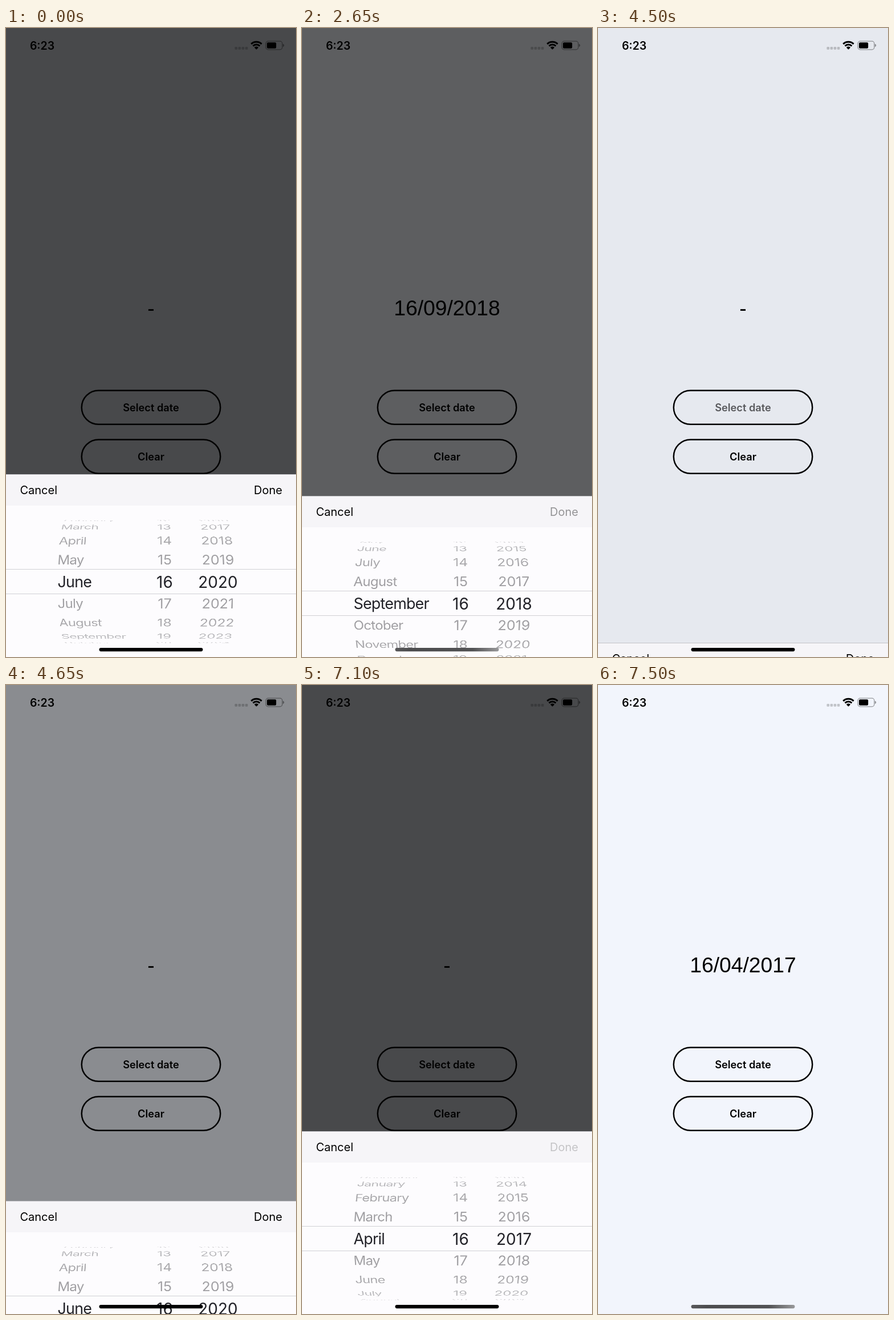
An HTML page with a canvas that plays this animation: 509 px wide and 1101 px high, repeating every 8000 ms.

```html
<!DOCTYPE html>
<html lang="en">
<head>
<meta charset="utf-8">
<title>Date picker</title>
<style>
  html, body { margin: 0; width: 509px; height: 1101px; overflow: hidden; background: #f2f5fc; }
  canvas { display: block; width: 509px; height: 1101px; }
</style>
</head>
<body>
<canvas id="stage" width="509" height="1101"></canvas>
<script>
const W = 509, H = 1101, LOOP = 8000;
const SHEET_TOP = 782, SHEET_H = H - SHEET_TOP;
const UI = 'Inter, "Liberation Sans", sans-serif';
const MONTHS = ['January', 'February', 'March', 'April', 'May', 'June', 'July',
  'August', 'September', 'October', 'November', 'December'];

// Wheel geometry: rows sit on a cylinder seen in weak perspective
const RADIUS = 108, STEP = 0.3639, DEPTH = 11.7, BAND = 21, ZOOM = 1.12, SS = 2;
const STRIP_H = Math.PI * RADIUS;

const ctx = document.getElementById('stage').getContext('2d');
const strip = document.createElement('canvas');
strip.width = W * SS;
strip.height = Math.ceil(STRIP_H * SS);
const sctx = strip.getContext('2d');

const clamp = v => Math.max(0, Math.min(1, v));
const linear = (t, a, b) => clamp((t - a) / (b - a));
const ease = (t, a, b) => { const p = linear(t, a, b); return p * p * (3 - 2 * p); };
const mod = (n, m) => ((n % m) + m) % m;

function label(c, text, x, y, font, { align = 'left', color = '#000', alpha = 1, spacing = 0 } = {}) {
  c.save();
  c.font = font;
  c.textAlign = align;
  c.fillStyle = color;
  c.globalAlpha *= alpha;
  c.letterSpacing = spacing + 'px';
  c.fillText(text, x, y);
  c.restore();
}

function roundBox(x, y, w, h, r) {
  ctx.beginPath();
  ctx.roundRect(x, y, w, h, r);
}

// --- state at time t ---

function stateAt(t) {
  const first = t < 3500;
  return {
    open: 1 - ease(t, 2571, 2941) + ease(t, 4440, 4805) - ease(t, 7121, 7491),
    month: first
      ? 5 + 2.75 * ease(t, 225, 450) + 0.25 * ease(t, 640, 705)
      : 5 - 2 * ease(t, 5110, 5550),
    day: 16,
    year: first
      ? 2020 - 1.6 * ease(t, 1275, 1450) - 0.4 * ease(t, 1735, 1850)
      : 2020 - 2.8 * ease(t, 6025, 6200) - 0.2 * ease(t, 6385, 6500),
    date: t >= 2600 && t < 4000 ? '16/09/2018' : t >= 7120 ? '16/04/2017' : '-',
    clear: 1 - 0.8 * linear(t, 3790, 3900) + 0.8 * linear(t, 4000, 4250),
    select: 1 - 0.65 * linear(t, 4390, 4440) + 0.65 * linear(t, 4440, 4590),
    done: t >= 7095 ? 0.2 + 0.8 * linear(t, 7140, 7390)
      : t >= 2445 ? 0.2 + 0.8 * linear(t, 2590, 2840) : 1,
    grey: linear(t, 2590, 2640) - linear(t, 4440, 4490) + linear(t, 7140, 7190)
  };
}

// --- main screen ---

function drawButton(y, text, alpha) {
  ctx.strokeStyle = '#000';
  ctx.lineWidth = 2.5;
  roundBox(132.75, y + 1.5, 243.5, 59.3, 29.65);
  ctx.stroke();
  label(ctx, text, 254.5, y + 38, '600 18.2px ' + UI, { align: 'center', alpha });
}

function drawScreen(s) {
  ctx.fillStyle = '#f2f5fc';
  ctx.fillRect(0, 0, W, H);
  label(ctx, s.date, 254.5, 503, '37.3px "Liberation Sans", Arial, sans-serif', { align: 'center' });
  drawButton(633, 'Select date', s.select);
  drawButton(719, 'Clear', s.clear);
  ctx.fillStyle = `rgba(0,0,0,${0.7 * s.open})`;
  ctx.fillRect(0, 0, W, H);
}

function drawStatus() {
  label(ctx, '6:23', 63.5, 38, '600 19.5px ' + UI, { align: 'center' });

  ctx.fillStyle = 'rgba(0,0,0,0.2)';
  for (let i = 0; i < 4; i++) {
    roundBox(401.5 + i * 6.1, 33, 4.6, 4.8, 1.2);
    ctx.fill();
  }

  // Wi-Fi fan
  ctx.save();
  ctx.beginPath();
  ctx.moveTo(439.5, 38);
  ctx.lineTo(428, 25.5);
  ctx.lineTo(428, 20);
  ctx.lineTo(451, 20);
  ctx.lineTo(451, 25.5);
  ctx.closePath();
  ctx.clip();
  ctx.strokeStyle = '#000';
  ctx.lineWidth = 3;
  for (const r of [13.2, 8.4]) {
    ctx.beginPath();
    ctx.arc(439.5, 37.5, r, Math.PI, 0);
    ctx.stroke();
  }
  ctx.fillStyle = '#000';
  ctx.beginPath();
  ctx.arc(439.5, 37.5, 5, Math.PI, 0);
  ctx.fill();
  ctx.restore();

  // Battery
  ctx.strokeStyle = ctx.fillStyle = 'rgba(0,0,0,0.38)';
  ctx.lineWidth = 1.3;
  roundBox(456.1, 23.2, 28.8, 14.6, 4);
  ctx.stroke();
  ctx.beginPath();
  ctx.arc(485.9, 30.5, 2.4, -Math.PI / 2, Math.PI / 2);
  ctx.fill();
  ctx.fillStyle = '#000';
  roundBox(458, 25.2, 16.2, 10.6, 2);
  ctx.fill();
}

// --- picker wheels ---

function wheels(s) {
  return [
    { pos: s.month, x: 90.5, align: 'left', size: 24, spacing: -0.7, text: n => MONTHS[mod(n, 12)] },
    { pos: s.day, x: 278.5, align: 'center', size: 25, spacing: 0, text: n => String(mod(n - 1, 31) + 1) },
    { pos: s.year, x: 372, align: 'center', size: 25, spacing: 0, text: n => String(n) }
  ];
}

function drawRows(c, col, mid, pitch, reach, zoom, color) {
  const near = Math.round(col.pos), size = col.size * zoom;
  for (let n = near - reach; n <= near + reach; n++) {
    const y = mid + pitch * (n - col.pos) + size * 0.363;
    label(c, col.text(n), col.x, y, `${size}px ${UI}`,
      { align: col.align, color, spacing: col.spacing * zoom });
  }
}

function drawPicker(s, mid) {
  const cols = wheels(s);
  sctx.setTransform(SS, 0, 0, SS, 0, 0);
  sctx.clearRect(0, 0, W, STRIP_H + 1);
  for (const col of cols) drawRows(sctx, col, STRIP_H / 2, RADIUS * STEP, 5, 1, '#1c1c22');

  // Wrap the flat strip round the cylinder, one scanline at a time
  ctx.save();
  const angle = y => Math.asin(Math.max(-1, Math.min(1, y / RADIUS)));
  for (let y = -RADIUS; y < RADIUS; y++) {
    if (y >= -BAND && y < BAND) continue;
    const a = angle(y), b = angle(y + 1), cos = Math.cos((a + b) / 2);
    const k = (DEPTH + 0.0655) / (DEPTH + 1 - cos);
    ctx.globalAlpha = 0.42 * Math.sqrt(cos);
    ctx.drawImage(strip, 0, (a * RADIUS + STRIP_H / 2) * SS, W * SS, (b - a) * RADIUS * SS,
      W / 2 * (1 - k), mid + y, W * k, 1);
  }
  ctx.restore();

  ctx.save();
  ctx.beginPath();
  ctx.rect(0, mid - BAND, W, BAND * 2);
  ctx.clip();
  for (const col of cols) drawRows(ctx, col, mid + 0.5, RADIUS * STEP * ZOOM, 1, ZOOM, '#222228');
  ctx.restore();

  ctx.fillStyle = '#d0d0d4';
  ctx.fillRect(0, mid - BAND - 1, W, 1);
  ctx.fillRect(0, mid + BAND, W, 1);
}

function drawSheet(s) {
  if (s.open <= 0) return;
  const top = Math.round(H - SHEET_H * s.open);
  ctx.fillStyle = '#fdfcfe';
  ctx.fillRect(0, top, W, SHEET_H);
  ctx.fillStyle = '#f6f5f8';
  ctx.fillRect(0, top, W, 54);
  ctx.fillStyle = '#c3c3c7';
  ctx.fillRect(0, top - 1, W, 1);
  label(ctx, 'Cancel', 24.4, top + 34, '20px ' + UI);
  label(ctx, 'Done', 485, top + 34, '20px ' + UI, { align: 'right', alpha: s.done });
  drawPicker(s, top + 187);
}

function drawHomeBar(grey) {
  const shade = v => `rgb(${v * grey},${v * grey},${(v + 2) * grey})`;
  const g = ctx.createLinearGradient(164, 0, 345, 0);
  g.addColorStop(0, shade(88));
  g.addColorStop(0.15, shade(76));
  g.addColorStop(0.75, shade(82));
  g.addColorStop(1, shade(152));
  ctx.fillStyle = g;
  roundBox(163.5, 1085, 182, 6.2, 3.1);
  ctx.fill();
}

function frame(now) {
  const s = stateAt(now % LOOP);
  drawScreen(s);
  drawStatus();
  drawSheet(s);
  drawHomeBar(clamp(s.grey));
  requestAnimationFrame(frame);
}
requestAnimationFrame(frame);
</script>
</body>
</html>
```
